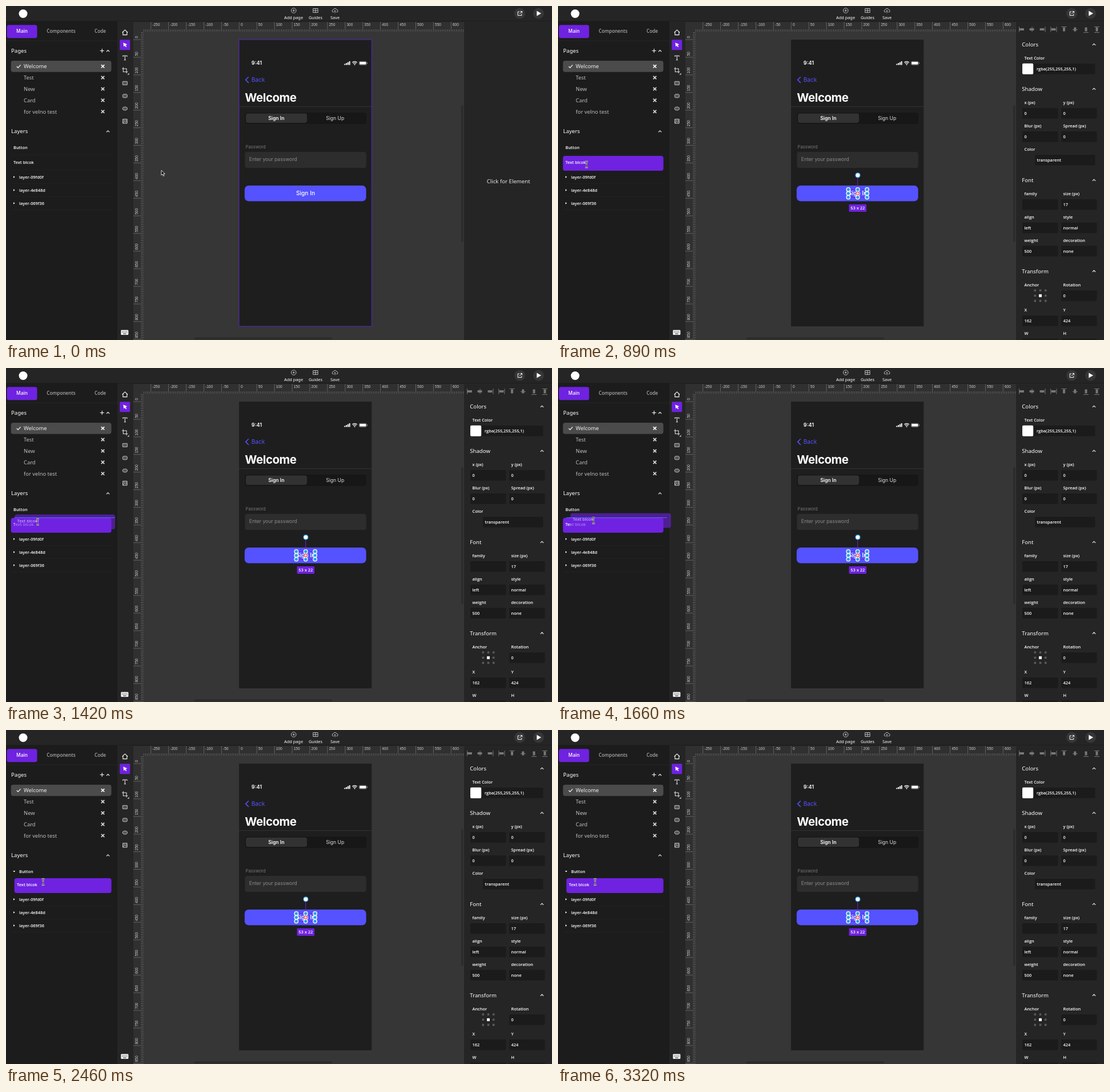
Write an HTML page that moves like this. It is 956 px wide and 586 px high and loops after 3.35 s.

```html
<!DOCTYPE html>
<html lang="en">
<head>
<meta charset="utf-8">
<title>Screen editor</title>
<style>
  html, body { margin: 0; width: 100%; height: 100%; overflow: hidden; background: #1c1c1c; }
  svg { display: block; }
  text { font-family: "Noto Sans", sans-serif; white-space: pre; }
  .ui { font-family: Inter, sans-serif; }
  .ruler { font-family: "Liberation Sans", Arial, sans-serif; }
  .label { font-family: "Open Sans", sans-serif; font-weight: 600; }
  .semi { font-weight: 600; }
  .bold { font-weight: 700; }
  .mid { text-anchor: middle; }
</style>
</head>
<body>
<svg id="stage" width="956" height="586" viewBox="0 0 956 586"></svg>
<script>
const LOOP = 3350, SELECT = 700, DRAG = 1180, DROP = 1800;
const PURPLE = '#6f22e0', INDIGO = '#5552ff';

const rect = (x, y, w, h, fill, r = 0, more = '') =>
  `<rect x="${x}" y="${y}" width="${w}" height="${h}" rx="${r}" fill="${fill}" ${more}/>`;
const text = (x, y, s, size, fill = '#fff', cls = '', more = '') =>
  `<text x="${x}" y="${y}" font-size="${size}" fill="${fill}" class="${cls}" ${more}>${s}</text>`;
const line = (d, stroke, w = 1, more = '') =>
  `<path d="${d}" fill="none" stroke="${stroke}" stroke-width="${w}" ${more}/>`;
const fill = (d, color) => `<path d="${d}" fill="${color}"/>`;
const circle = (x, y, r, color, more = '') =>
  `<circle cx="${x}" cy="${y}" r="${r}" fill="${color}" ${more}/>`;
const group = (id, body) => `<g id="${id}">${body}</g>`;
const chevronUp = (x, y) => line(`M${x - 2.6} ${y + 1.4}l2.6-2.7 2.6 2.7`, '#fff', 1.1);

function topBar() {
  const label = (x, s) => text(x, 23, s, 7.4, '#fff', 'mid');
  return rect(0, 0, 956, 27, '#252525') + rect(0, 26.5, 956, 1, '#161616') +
    circle(30, 13.5, 7.5, '#fff') +
    label(503.5, 'Add page') + label(542, 'Guides') + label(576, 'Save') +
    line('M508 8a4.3 4.3 0 1 0-8.6 0a4.3 4.3 0 1 0 8.6 0M501.6 8h4.2M503.7 5.9v4.2', '#ddd', .8) +
    line('M537.7 4.5h8.4v7h-8.4zM541.9 4.5v7M537.7 8h8.4', '#ddd', .8) +
    line('M574 10.8h-.5a2.2 2.2 0 0 1-.3-4.4a3 3 0 0 1 5.7 0a2.2 2.2 0 0 1 0 4.4h-.6M576 12.5v-4.6M574.4 9.3l1.6-1.6 1.6 1.6', '#ddd', .8) +
    circle(899.5, 13, 9.5, '#363636') + circle(932.5, 13, 9.5, '#363636') +
    line('M899 10h-2.8v6.6h6.6v-2.8M900.5 9.4h3v3M903.3 9.6l-4.3 4.3', '#fff', 1) +
    fill('M929.3 8.6l7.8 4.4-7.8 4.4z', '#fff');
}

function sidePanel() {
  const pages = ['Welcome', 'Test', 'New', 'Card', 'for velno test'];
  return rect(0, 27, 195, 559, '#1c1c1c') + rect(0, 60.5, 195, 1, '#262626') +
    rect(1.5, 33.2, 53, 23, PURPLE, 3.5) +
    text(28, 47.3, 'Main', 8.2, '#fff', 'label mid') +
    text(96.5, 47.3, 'Components', 8.2, '#aaa', 'label mid') +
    text(165, 47.3, 'Code', 8.2, '#aaa', 'label mid') +
    text(9, 82, 'Pages', 9.6) + text(9, 223, 'Layers', 9.6) +
    line('M164.7 78.5h7M168.2 75v7', '#fff', 1.1) + chevronUp(178.5, 78.8) + chevronUp(178.5, 220) +
    rect(8.7, 96, 175.8, 19.8, '#4b4b4b', 4) +
    line('M18.8 106l2.3 2.4 4.4-5', '#fff', 1.2) +
    pages.map((name, i) => {
      const y = 105.8 + i * 19.85;
      return text(31, y + 3.4, name, 9.4, i ? '#bdbdbd' : '#f0f0f0') +
        line(`M166.8 ${y - 2.7}l5.4 5.4m0-5.4l-5.4 5.4`, i ? '#d8d8d8' : '#fff', 1.7);
    }).join('');
}

function toolbar() {
  const outline = (shape) => `<g fill="#555" stroke="#ccc" stroke-width=".9">${shape}</g>`;
  return rect(195, 27, 28, 559, '#252525') +
    line('M203.6 46.5l4.7-4.6 4.7 4.6M204.8 45.6v5h7v-5', '#fff', 1.1) +
    rect(199.2, 59.2, 18, 18, PURPLE, 1) +
    fill('M205.3 64.3l7 3.2-2.8 1.1 1.8 2.8-1.4.9-1.8-2.8-1.9 2z', '#fff') +
    line('M204.7 89v-1.7h7.2v1.7M208.3 87.3v7.4M206.7 94.8h3.2', '#e5e5e5', 1.1) +
    line('M205.3 107.5v8h8M203 110h8v8.3', '#ddd', 1.1) + fill('M215.5 117.5v3h-3z', '#ddd') +
    outline(rect(204.3, 132.4, 8, 6, '#555', .3) + rect(204.3, 154.8, 8, 6, '#555', 2) +
      '<ellipse cx="208.3" cy="180" rx="4.1" ry="2.9"/>') +
    line('M204.6 198.6h7.4v7.2h-7.4zM204.6 205l2.8-2.7 1.6 1.5 1.4-1.4 1.6 1.6', '#ddd', 1) +
    circle(206.8, 200.8, .9, '#ddd') + circle(210, 200.8, .9, '#ddd') +
    rect(201.3, 568.5, 13, 8.5, '#fff', 1.2) +
    line('M203 571h9.6M203 573h9.6', '#252525', 1, 'stroke-dasharray="1.1 1"') +
    line('M205 575.2h5.6', '#252525', 1);
}

function rulers() {
  const step = 30.92, left = 408.3, top = 59;
  let major = '', minor = '', labels = '';
  for (let i = -54; i <= 170; i++) {
    const x = left + i * step / 10, y = top + i * step / 10, big = i % 10 === 0;
    if (x > 241 && x < 802) {
      if (big) {
        major += `M${x} 28v17`;
        labels += text(x + 2.6, 35.4, i * 5, 6.5, '#ccc', 'ruler');
      } else minor += `M${x} 41v4`;
    }
    if (y > 45 && y < 586) {
      if (big) {
        major += `M223 ${y}h18`;
        labels += text(0, 0, i * 5, 6.5, '#ccc', 'ruler', `transform="translate(230.8 ${y - 2.4}) rotate(-90)"`);
      } else minor += `M236 ${y}h5`;
    }
  }
  return rect(223, 27, 579, 559, '#363636') + rect(223, 27, 579, 18, '#303030') + rect(223, 27, 18, 559, '#303030') +
    line(minor, '#777', .7) + line(major, '#777', .7) + labels +
    rect(797, 174, 3.5, 240, '#2b2b2b', 1.7) + rect(329, 581.5, 242, 3.5, '#2b2b2b', 1.7);
}

function phone() {
  const bars = [2, 3.3, 4.8, 6.3].map((h, i) => rect(592.2 + i * 2.8, 103.4 - h, 2, h, '#fff', .4)).join('');
  return rect(408, 59, 232.3, 503, '#1e1e1e') +
    text(439, 102.9, '9:41', 9.1, '#fff', 'ui semi mid') + bars +
    line('M606.2 99.2a6 6 0 0 1 8.6 0M607.8 101a3.8 3.8 0 0 1 5.4 0', '#fff', 1.2) +
    fill('M610.5 104l-1.4-1.6a2 2 0 0 1 2.8 0z', '#fff') +
    rect(618.3, 97.2, 13, 6.2, 'none', 1.8, 'stroke="#aaa" stroke-width=".6"') +
    rect(619.2, 98.1, 11.2, 4.4, '#fff', 1) + rect(632, 99.2, .9, 2.2, '#aaa', .4) +
    line('M424.4 124.8l-4.8 4.8 4.8 4.8', INDIGO, 1.5, 'stroke-linecap="round"') +
    text(429.7, 133.2, 'Back', 10.1, INDIGO, 'ui') +
    text(418.3, 167.8, 'Welcome', 20.4, '#fff', 'ui bold', 'letter-spacing="-.4"') +
    rect(408, 176, 232, .8, '#3a3a3a') +
    rect(418.3, 187, 212.7, 20, '#171717', 4.5) + rect(420, 188.6, 107, 16.4, '#323232', 4) +
    text(473.3, 199.9, 'Sign In', 8.6, '#fff', 'ui semi mid') +
    text(576.2, 199.9, 'Sign Up', 8.6, '#ddd', 'ui mid') +
    text(419.6, 250, 'Password', 7.6, '#77777a', 'ui') +
    rect(418.3, 256, 212.4, 28, '#2d2d2d', 4) +
    text(425.8, 272.3, 'Enter your password', 8.6, '#8c8c8f', 'ui') +
    rect(417.8, 315, 212.8, 27.6, INDIGO, 7) +
    text(524.5, 332.4, 'Sign In', 10.1, '#fff', 'ui mid', 'font-weight="500"');
}

const layerName = (x, y, s) => text(x, y + 2.8, s, 7.4, '#fff', 'label');
const divider = (y) => rect(9, y, 175, .7, '#242424');
const folders = (top) => ['layer-09fd0f', 'layer-4e848d', 'layer-069f36'].map((name, i) => {
  const y = top + i * 23;
  return fill(`M13 ${y - 1.8}l2.7 1.8-2.7 1.8z`, '#fff') + layerName(23, y, name) + divider(y + 11.2);
}).join('');
const layerRow = (x, y, w) => rect(x, y, w, 25.8, PURPLE, 4) + layerName(x + 4.4, y + 11, 'Text blcok');

function layers() {
  return group('flat', layerName(13, 248, 'Button') + divider(261) + divider(287) +
      layerName(13, 274, 'Text blcok') + folders(300)) +
    group('picked', layerRow(8.6, 263.1, 176)) +
    group('nested', fill('M12.4 246.9h3.8l-1.9 2.6z', '#fff') + layerName(23, 248, 'Button') +
      layerRow(14.7, 260.1, 169.9) + folders(297)) +
    `<g id="ghost" opacity=".6">${layerRow(8.6, 263.1, 176)}</g>` +
    group('slot', rect(15, 262, 175.5, 1.2, '#4f63f5'));
}

function inspector() {
  const heading = (y, s) => text(812.3, y + 3.7, s, 9.6) + chevronUp(938.5, y);
  const label = (x, y, s) => text(x, y, s, 7.4, '#fff', 'label');
  const field = (x, y, w, value, tx) => rect(x, y, w, 18.5, '#1b1b1b', 1.5) + label(tx, y + 12.3, value);
  const pair = (y, a, b, va, vb) => label(816.5, y, a) + label(884.5, y, b) +
    field(813, y + 7, 62.5, va, 816.5) + field(881, y + 7, 62.5, vb, 884.5);
  const bar = (x, vertical, at) => vertical
    ? rect(x - 2, 37.5, 4, 7, '#777', .8) + rect(x - 4.5, 36 + at * 5, 9, 1, '#777')
    : rect(x - 4, 39, 8, 4, '#777', .8) + rect(x - 5 + at * 5, 36.3, 1, 9.4, '#777');
  const aligns = [812, 829.5, 847.5, 867.5].map((x, i) => bar(x, false, Math.min(i, 2))).join('') +
    rect(862.3, 36.3, 1, 9.4, '#777') +
    [886, 905.3, 924.5, 943.5].map((x, i) => bar(x, true, Math.min(i, 2))).join('') +
    rect(939, 36, 9, 1, '#777');
  let anchor = '';
  for (let r = 0; r < 3; r++) for (let c = 0; c < 3; c++) {
    const hub = r === 1 && c === 1, s = hub ? 5 : 3.6;
    anchor += rect(844.5 + (c - 1) * 9.2 - s / 2, 508.2 + (r - 1) * 9.2 - s / 2, s, s, hub ? '#fff' : '#5a5a5a', .5);
  }
  return aligns + heading(67.5, 'Colors') + label(816.5, 93.7, 'Text Color') +
    field(832, 101, 108.5, 'rgba(255,255,255,1)', 838) + rect(813, 100.8, 19.2, 19, '#fff', 2) +
    heading(145.5, 'Shadow') + pair(172, 'x (px)', 'y (px)', 0, 0) +
    pair(213, 'Blur (px)', 'Spread (px)', 0, 0) +
    label(816.5, 253.6, 'Color') + field(835, 261, 105.5, 'transparent', 838.5) +
    heading(305.5, 'Font') + pair(332, 'family', 'size (px)', '', 17) +
    pair(373, 'align', 'style', 'left', 'normal') + pair(413.7, 'weight', 'decoration', 500, 'none') +
    heading(465.2, 'Transform') + label(816.5, 491.6, 'Anchor') + label(884.5, 491.6, 'Rotation') +
    anchor + field(881, 499, 62.5, 0, 884.5) +
    pair(536, 'X', 'Y', 162, 424) + pair(576.6, 'W', 'H', '', '');
}

function selection() {
  const blue = '#2a9fe8', ring = `stroke="${blue}" stroke-width="1.3"`;
  let handles = '';
  for (const y of [322, 328.8, 335.6]) for (const x of [508.3, 524.7, 541.1])
    handles += circle(x, y, 3.3, blue, 'stroke="#fff" stroke-width="1.3"');
  return line('M524.7 300v22', PURPLE) + rect(508.3, 322, 32.8, 13.6, 'none', 0, `stroke="${PURPLE}"`) +
    handles + circle(524.7, 328.8, 2.6, '#fff', 'stroke="#f0455a" stroke-width="1.4"') +
    circle(524.9, 296.9, 4, '#fff', ring) + rect(509.5, 348, 30.5, 13, PURPLE, 1) +
    text(524.8, 357.2, '53 x 22', 7.5, '#fff', 'label mid');
}

const stage = document.getElementById('stage');
stage.innerHTML = rulers() + phone() + topBar() + sidePanel() + toolbar() + layers() +
  rect(802, 27, 154, 559, '#252525') +
  group('idle', rect(408, 59, 232.3, 503, 'none', 0, 'stroke="#5a25c4"') +
    text(879.7, 310.8, 'Click for Element', 9.65, '#e8e8e8', 'mid')) +
  group('active', inspector() + selection()) +
  group('arrow', '<path d="M0 0v8.6l2-1.8 1.5 3.3 1.5-.7-1.5-3.2 2.8-.2z" fill="#111" stroke="#eee" stroke-width=".9"/>') +
  group('beam', [['#eee', 2.4], ['#222', 1]].map(([color, w]) =>
    line('M-2.3-5.2q2.3 0 2.3 1.4q0-1.4 2.3-1.4M0-4v8M-2.3 5.2q2.3 0 2.3-1.4q0 1.4 2.3 1.4M-1.2 1.5h2.4', color, w)
  ).join(''));

const el = (id) => document.getElementById(id);
const show = (id, on) => el(id).setAttribute('visibility', on ? 'visible' : 'hidden');
const move = (id, x, y) => el(id).setAttribute('transform', `translate(${x} ${y})`);

// Pointer path: time, x, y
const path = [[40, 272, 288.3], [420, 56, 274], [520, 56, 274], [SELECT, 50, 278],
  [1100, 50, 278], [1420, 55.5, 270], [DROP, 65, 266.5]];

function pointerAt(t) {
  const next = path.findIndex(p => p[0] > t);
  if (next < 1) return (next ? path[path.length - 1] : path[0]).slice(1);
  const [a, b] = [path[next - 1], path[next]];
  const u = (t - a[0]) / (b[0] - a[0]), k = u * u * (3 - 2 * u);
  return [a[1] + (b[1] - a[1]) * k, a[2] + (b[2] - a[2]) * k];
}

function draw(now) {
  const t = now % LOOP, [x, y] = pointerAt(t);
  const selected = t >= SELECT, dropped = t >= DROP, dragging = t >= DRAG && !dropped, overText = x < 110;
  show('idle', !selected);
  show('active', selected);
  show('flat', !dropped);
  show('picked', selected && !dropped);
  show('nested', dropped);
  show('ghost', dragging);
  show('slot', dragging);
  show('arrow', !overText);
  show('beam', overText);
  move('ghost', x - 49, y - 276);
  move('arrow', x, y);
  move('beam', x, y);
}

const start = performance.now();
(function tick() {
  draw(performance.now() - start);
  requestAnimationFrame(tick);
})();
</script>
</body>
</html>
```
